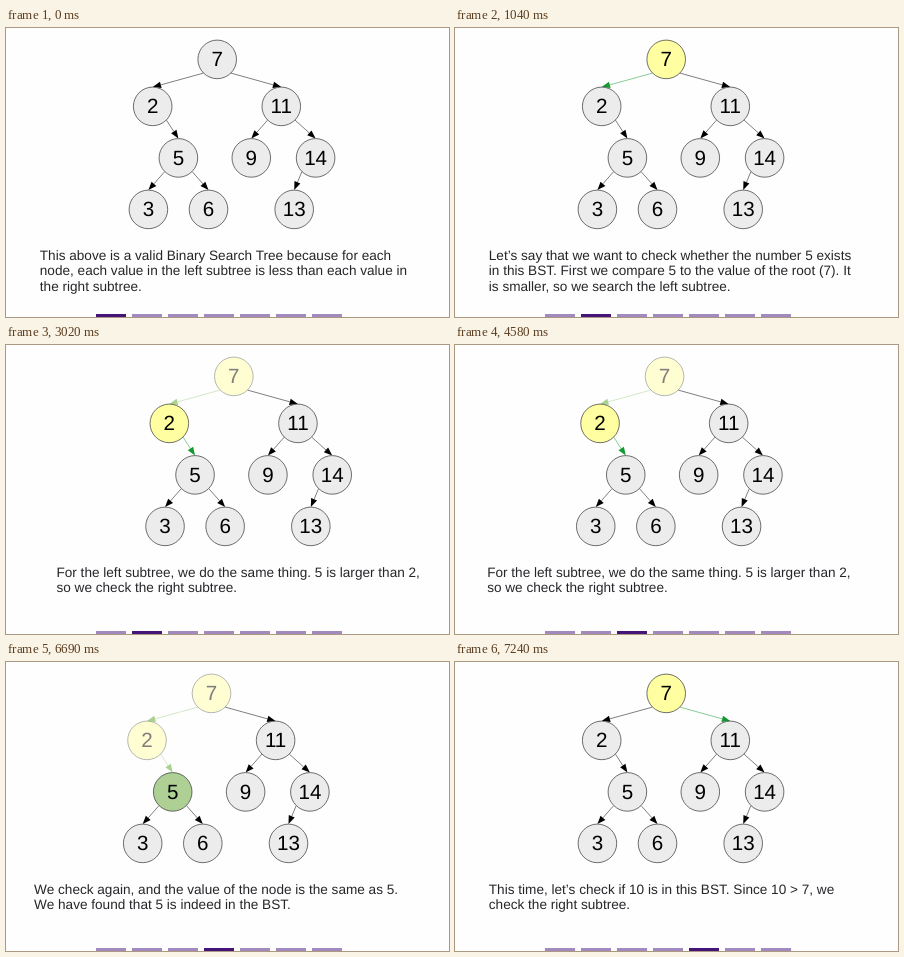
An HTML page for the animation above (8 s loop, 443 by 289 pixels).

```html
<!DOCTYPE html>
<html lang="en">
<head>
<meta charset="utf-8">
<title>Searching a binary search tree</title>
<style>
  html, body { margin: 0; width: 100%; height: 100%; overflow: hidden; background: #fefefe; }
  svg { display: block; width: 100%; height: 100%; }
  text { font-family: "Liberation Sans", Arial, sans-serif; text-rendering: geometricPrecision; }
  .label { font-size: 20.6px; text-anchor: middle; fill: #000; }
  .caption { font-size: 13.6px; fill: #26262a; }
</style>
</head>
<body>
<svg id="stage" viewBox="0 0 443 289"></svg>
<script>
const W = 443, LOOP = 8000;
const stage = document.getElementById('stage');

const nodes = {
  7: [211.2, 31.4], 2: [146.7, 78.4], 11: [275.3, 78.4],
  5: [172.4, 129.9], 9: [245.3, 129.9], 14: [309.6, 129.9],
  3: [142.4, 181.4], 6: [202.5, 181.4], 13: [288.2, 181.4]
};
const edges = [[7, 2], [7, 11], [2, 5], [11, 9], [11, 14], [5, 3], [5, 6], [14, 13]];

const fills = { plain: '#ececec', active: '#ffffa2', visited: '#ffffa8', found: '#afd095' };

const slides = [
  { nodes: {}, edges: {}, lines: [
    'This above is a valid Binary Search Tree because for each',
    'node, each value in the left subtree is less than each value in',
    'the right subtree.'] },
  { nodes: { 7: 'active' }, edges: { '7-2': 'active' }, lines: [
    'Let’s say that we want to check whether the number 5 exists',
    'in this BST. First we compare 5 to the value of the root (7). It',
    'is smaller, so we search the left subtree.'] },
  { nodes: { 7: 'visited', 2: 'active' }, edges: { '7-2': 'visited', '2-5': 'active' }, lines: [
    'For the left subtree, we do the same thing. 5 is larger than 2,',
    'so we check the right subtree.'] },
  { nodes: { 7: 'visited', 2: 'visited', 5: 'found' }, edges: { '7-2': 'visited', '2-5': 'visited' }, lines: [
    'We check again, and the value of the node is the same as 5.',
    'We have found that 5 is indeed in the BST.'] },
  { nodes: { 7: 'active' }, edges: { '7-11': 'active' }, lines: [
    'This time, let’s check if 10 is in this BST. Since 10 > 7, we',
    'check the right subtree.'] }
];

// Start and end of each slide change
const moves = [[470, 1040], [2492, 3105], [4556, 5126], [6643, 7235]];

function add(parent, tag, attrs, text) {
  const el = document.createElementNS('http://www.w3.org/2000/svg', tag);
  for (const key in attrs) el.setAttribute(key, attrs[key]);
  if (text) el.textContent = text;
  parent.appendChild(el);
  return el;
}

function drawEdge(parent, [a, b], state) {
  const [ax, ay] = nodes[a], [bx, by] = nodes[b];
  const x1 = ax + Math.sign(bx - ax) * 13.7, y1 = ay + 13.7;
  const x2 = bx, y2 = by - 19.3;
  const len = Math.hypot(x2 - x1, y2 - y1);
  const ux = (x2 - x1) / len, uy = (y2 - y1) / len;
  const cx = x2 - ux * 8.4, cy = y2 - uy * 8.4;
  const color = state === 'active' ? '#12992f' : state === 'visited' ? '#a9d290' : '#000';
  add(parent, 'line', { x1, y1, x2: cx, y2: cy, stroke: color, 'stroke-width': 0.5 });
  add(parent, 'path', {
    d: `M${x2} ${y2}L${cx - uy * 3.2} ${cy + ux * 3.2}L${cx + uy * 3.2} ${cy - ux * 3.2}Z`,
    fill: color
  });
}

function drawNode(parent, value, state = 'plain') {
  const [x, y] = nodes[value];
  const g = add(parent, 'g', { opacity: state === 'visited' ? 0.5 : 1 });
  add(g, 'circle', { cx: x, cy: y, r: 19.3, fill: fills[state], stroke: '#333', 'stroke-width': 0.7 });
  add(g, 'text', { x, y: y + 6.9, class: 'label' }, value);
}

const groups = slides.map(slide => {
  const g = add(stage, 'g', {});
  edges.forEach(e => drawEdge(g, e, slide.edges[e.join('-')]));
  Object.keys(nodes).forEach(v => drawNode(g, v, slide.nodes[v]));
  slide.lines.forEach((line, i) =>
    add(g, 'text', { x: 33.8, y: 232.2 + i * 15.2, class: 'caption' }, line));
  return g;
});

const bars = Array.from({ length: 7 }, (_, i) =>
  add(stage, 'rect', { x: 90 + i * 36, y: 286, width: 30, height: 3 }));

// cubic-bezier(.42, 0, .58, 1)
function easeInOut(x) {
  if (x <= 0) return 0;
  if (x >= 1) return 1;
  let lo = 0, hi = 1, s = 0.5;
  for (let i = 0; i < 24; i++) {
    s = (lo + hi) / 2;
    const bx = 1.26 * (1 - s) * (1 - s) * s + 1.74 * (1 - s) * s * s + s * s * s;
    if (bx < x) lo = s; else hi = s;
  }
  return s * s * (3 - 2 * s);
}

function render(t) {
  let pos = 0, current = 0;
  for (const [start, end] of moves) {
    pos += easeInOut((t - start) / (end - start));
    if (t >= end) current++;
  }
  groups.forEach((g, i) => {
    const x = (i - pos) * W;
    g.setAttribute('transform', `translate(${x.toFixed(2)} 0)`);
    g.setAttribute('visibility', Math.abs(x) < W ? 'visible' : 'hidden');
  });
  bars.forEach((bar, i) => bar.setAttribute('fill', i === current ? '#451478' : '#a28abf'));
}

const begin = performance.now();
function tick() {
  render((performance.now() - begin) % LOOP);
  requestAnimationFrame(tick);
}
tick();
</script>
</body>
</html>
```
